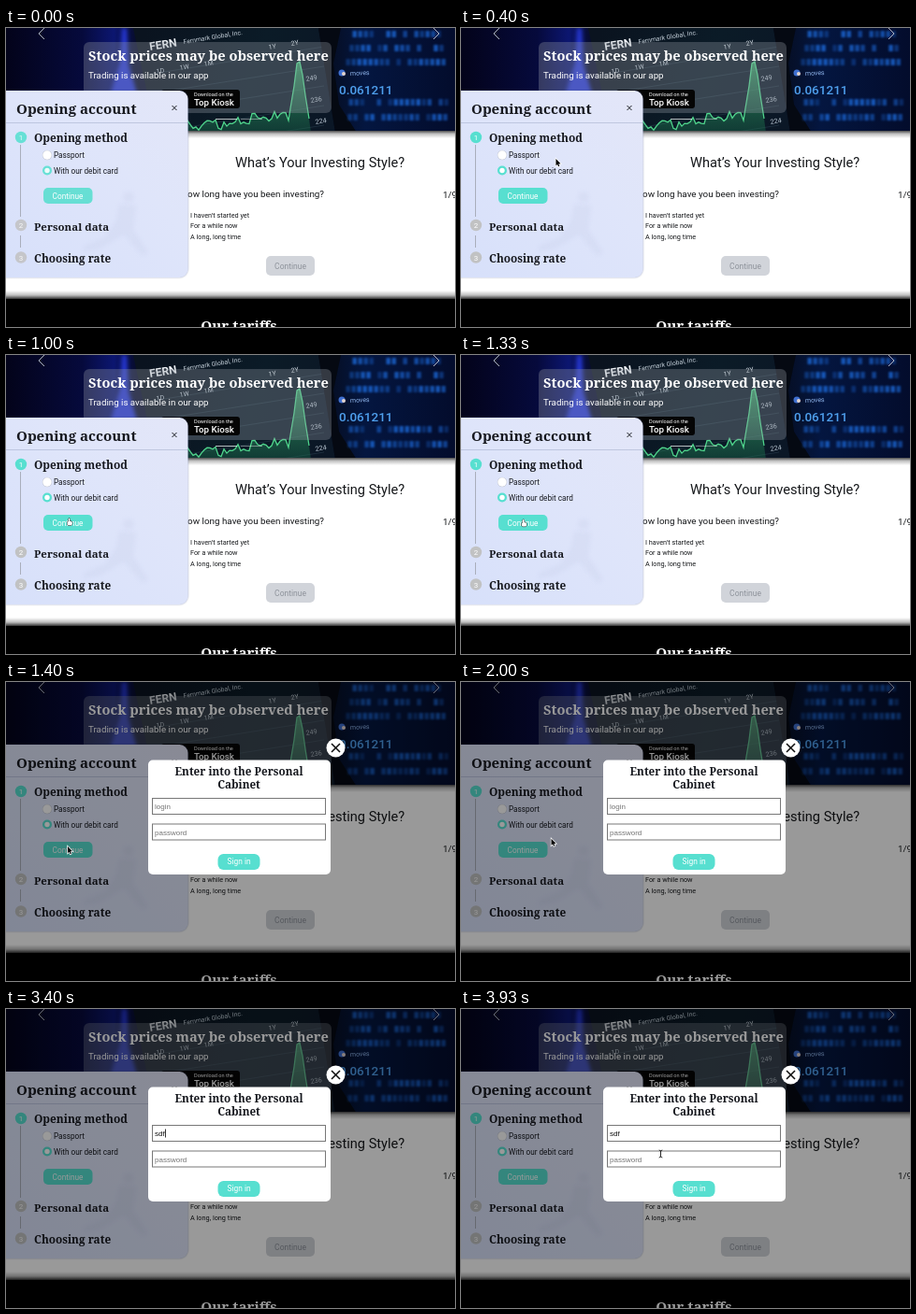
Write an HTML page with a canvas that moves like this. It is 480 px wide and 320 px high and loops after 3.99 s.

```html
<!DOCTYPE html>
<html lang="en">
<head>
<meta charset="utf-8">
<title>Opening account</title>
<style>
html, body { margin: 0; width: 100%; height: 100%; overflow: hidden; background: #000; }
canvas { display: block; width: 480px; height: 320px; }
</style>
</head>
<body>
<canvas id="stage" width="480" height="320"></canvas>
<script>
const LOOP = 3990, STEP = 200 / 3;
const MODAL_AT = 1395, FADE_IN = 260;
const TEAL = '#57dfd0', INK = '#17191f', TILT = -0.16;
const SANS = 'Roboto, sans-serif', SERIF = '"Noto Serif", serif', FIELD = '"Liberation Sans", sans-serif';
const stage = document.getElementById('stage').getContext('2d');
let c = stage;

function text(s, x, y, size, color, family = SANS, weight = 400, align = 'left') {
  c.font = `${weight} ${size}px ${family}`;
  c.textAlign = align;
  c.fillStyle = color;
  c.fillText(s, x, y);
}

function heading(s, x, y, size, color = INK, align = 'left') {
  text(s, x, y, size, color, SERIF, 700, align);
}

function tilted(s, x, y, size, color, weight = 400, angle = TILT) {
  c.save();
  c.translate(x, y);
  c.rotate(angle);
  text(s, 0, 0, size, color, SANS, weight);
  c.restore();
}

function rect(x, y, w, h, color) {
  c.fillStyle = color;
  c.fillRect(x, y, w, h);
}

function box(x, y, w, h, r, color) {
  c.beginPath();
  c.roundRect(x, y, w, h, r);
  c.fillStyle = color;
  c.fill();
}

function disc(x, y, r, color) {
  c.beginPath();
  c.arc(x, y, r, 0, Math.PI * 2);
  c.fillStyle = color;
  c.fill();
}

function path(points, color, width) {
  c.beginPath();
  points.forEach(([x, y]) => c.lineTo(x, y));
  c.strokeStyle = color;
  c.lineWidth = width;
  c.stroke();
}

function shape(points, color) {
  c.beginPath();
  points.forEach(([x, y]) => c.lineTo(x, y));
  c.closePath();
  c.fillStyle = color;
  c.fill();
}

function gradient(x0, y0, x1, y1, ...stops) {
  const g = c.createLinearGradient(x0, y0, x1, y1);
  stops.forEach(([at, color]) => g.addColorStop(at, color));
  return g;
}

function seeded(seed) {
  return () => (seed = (seed * 16807) % 2147483647) / 2147483647;
}

function drawPhoto() {
  const rnd = seeded(71);
  rect(0, 0, 480, 112, gradient(0, 0, 480, 0,
    [0, '#03031a'], [0.17, '#060a3c'], [0.24, '#0c1670'], [0.29, '#070c2c'],
    [0.7, '#060c1c'], [0.8, '#041640'], [1, '#030c2c']));

  // blurred bar on the left
  c.save();
  c.filter = 'blur(2px)';
  shape([[112, 70], [122, 36], [124, 0], [129, 0], [131, 40], [140, 70]], '#2637d2');
  c.restore();

  // tablet
  shape([[136, 0], [334, 0], [352, 112], [160, 112]], gradient(150, 0, 350, 60, [0, '#0a131f'], [0.6, '#0b1b27'], [1, '#0b1726']));
  for (let i = 0; i < 5; i++) {
    path([[150, 50 + i * 21], [340, 20 + i * 21]], 'rgba(125,165,185,.22)', 0.7);
  }
  tilted('FERN', 154, 24, 12, '#eef2f6', 700);
  tilted('Fernmark Global, Inc.', 190, 17, 6.8, '#c9d4de');
  tilted('1D', 161, 49, 7, '#c3ced8');
  tilted('1W', 186, 45, 7, '#c3ced8');
  tilted('1M', 212, 41, 7, '#c3ced8');
  tilted('1Y', 281, 23, 7, '#dbe5ec');
  tilted('2Y', 305, 19, 7, '#dbe5ec');

  // price line
  const line = [[190, 111]];
  for (let x = 194; x < 304; x += 3) {
    line.push([x, 106 - (x - 194) * 0.12 + (rnd() - 0.5) * 14]);
  }
  line.push([304, 86], [308, 62], [311, 38], [314, 36], [317, 50], [320, 72], [324, 97]);
  shape([...line, [326, 112], [190, 112]], gradient(0, 35, 0, 112, [0, 'rgba(75,205,125,.7)'], [1, 'rgba(25,110,75,.4)']));
  path(line, '#4fd58c', 1.3);
  tilted('249', 321, 57, 7.2, '#b9c6d2');
  tilted('236', 326, 80, 7.2, '#b9c6d2');
  tilted('224', 331, 103, 7.2, '#b9c6d2');

  // numbers board on the right
  shape([[334, 0], [358, 0], [350, 38], [356, 82], [375, 112], [352, 112]], '#050912');
  c.save();
  c.filter = 'blur(1px)';
  for (const y of [3, 18, 33, 76, 92]) {
    for (let x = 362 + rnd() * 12; x < 470; x += 6) {
      if (rnd() < 0.72) rect(x, y, 4.5, 7, `rgba(28,104,215,${0.3 + rnd() * 0.5})`);
    }
  }
  c.restore();
  tilted('0.061211', 356, 71, 13.5, '#4fa0ee', 500, 0);
  disc(359, 48, 3.5, '#3f6fd0');
  disc(361, 49, 2, '#e3d3cc');
  tilted('moves', 368, 51, 7, '#8fb4ea', 400, -0.05);
}

function drawHero() {
  drawPhoto();
  path([[41, 0], [35, 6], [41, 12]], '#aeb6c5', 1);
  path([[457, 0], [463, 6], [457, 12]], '#aeb6c5', 1);
  box(83, 15, 265, 76, 6, 'rgba(150,155,165,.33)');
  heading('Stock prices may be observed here', 88, 34.5, 14.65, '#fff');
  text('Trading is available in our app', 88, 54, 9.75, '#fff');
  box(166, 66, 84, 20, 3, '#050505');
  text('Download on the', 201, 73, 5.6, '#fff');
  text('Top Kiosk', 201, 83, 9.8, '#fff', SANS, 500);
  rect(224, 97, 23, 1, 'rgba(255,255,255,.7)');
  rect(251, 97, 23, 1, 'rgba(255,255,255,.4)');
}

function drawQuiz() {
  rect(0, 110, 480, 181, '#fff');
  rect(0, 110, 480, 8, gradient(0, 110, 0, 118, [0, 'rgba(0,0,0,.7)'], [0.4, 'rgba(0,0,0,.25)'], [1, 'rgba(0,0,0,0)']));
  text('What’s Your Investing Style?', 245, 149, 14.6, '#16181b');
  text('How long have you been investing?', 340, 181, 9.85, '#16181b', SANS, 400, 'right');
  text('1/9', 467, 182, 9.85, '#16181b');
  ['I haven’t started yet', 'For a while now', 'A long, long time'].forEach((s, i) =>
    text(s, 197, 202.5 + i * 11.8, 7.3, '#16181b'));
  box(278, 244, 52, 21, 5, '#d1d4da');
  text('Continue', 304, 257.5, 8.5, '#8d929a', SANS, 400, 'center');
  rect(0, 281, 480, 9, gradient(0, 281, 0, 290, [0, 'rgba(0,0,0,0)'], [0.55, 'rgba(0,0,0,.25)'], [1, 'rgba(0,0,0,.8)']));
  rect(0, 290, 480, 30, '#000');
  heading('Our tariffs', 249, 324, 15.2, '#fff', 'center');
}

function drawPanel(solid) {
  c.save();
  c.shadowColor = 'rgba(60,75,130,.5)';
  c.shadowBlur = 2;
  box(-12, 67, 206.5, 200, 9, gradient(0, 267, 195, 67, [0, '#d7e0fa'], [0.6, '#dfe5fa'], [1, '#e3e6f8']));
  c.restore();

  // soft figure showing through the glass
  c.save();
  c.filter = 'blur(2px)';
  c.globalAlpha = 0.12;
  disc(131, 181, 6, '#a9b4d2');
  shape([[121, 189], [139, 190], [136, 216], [152, 240], [146, 244], [126, 221], [100, 236], [82, 239], [84, 233], [106, 224], [118, 206]], '#a9b4d2');
  c.restore();

  heading('Opening account', 11, 92, 15.1);
  path([[177.5, 83], [182.5, 88]], INK, 1);
  path([[182.5, 83], [177.5, 88]], INK, 1);
  rect(0, 101, 194, 1, 'rgba(150,160,190,.45)');
  rect(15, 125, 1, 77, '#a9aebb');
  rect(15, 222, 1, 13, '#a9aebb');

  c.save();
  c.globalAlpha = solid;
  [[117, TEAL], [211, '#c1c2c3'], [245.5, '#c1c2c3']].forEach(([y, color], i) => {
    disc(16, y, 6.2, color);
    text(String(i + 1), 16, y + 3, 8, '#fff', SANS, 400, 'center');
  });
  disc(44, 152.5, 5, TEAL);
  disc(44, 152.5, 2.7, '#fff');
  box(40, 171, 52.5, 17, 5, TEAL);
  c.restore();

  disc(44, 136, 5.2, '#c5cad6');
  disc(44, 136, 4.7, '#fff');
  heading('Opening method', 30, 122, 11.9);
  heading('Personal data', 30, 216.5, 11.5);
  heading('Choosing rate', 30, 251, 11.8);
  text('Passport', 51, 139, 8.2, INK);
  text('With our debit card', 51, 155.5, 8.2, INK);
  text('Continue', 66, 182.5, 8.3, '#fff', SANS, 400, 'center');
}

function drawField(y, value, hint, caret) {
  rect(156, y, 186, 18, '#777');
  rect(157, y + 1, 184, 16, '#fff');
  text(value || hint, 159, y + 12, 8, value ? '#111' : '#757575', FIELD);
  if (caret) rect(159.5 + (value ? c.measureText(value).width : 0), y + 4.5, 0.8, 9, '#000');
}

function drawModal(t) {
  rect(0, 0, 480, 320, 'rgba(0,0,0,.4)');
  box(152, 83.5, 195, 122.5, 5, '#fff');
  disc(352.5, 70.5, 10, '#fff');
  path([[348, 66], [357, 75]], '#111', 1.6);
  path([[357, 66], [348, 75]], '#111', 1.6);
  heading('Enter into the Personal', 249, 100, 11.7, INK, 'center');
  heading('Cabinet', 249, 114, 11.7, INK, 'center');
  const typed = 'sdf'.slice(0, t < 3060 ? 0 : 1 + Math.floor((t - 3060) / 133));
  drawField(124, typed, 'login', t > 2790 && t < 3795);
  drawField(151.5, '', 'password', false);
  box(226.5, 184, 45, 17, 6, TEAL);
  text('Sign in', 249, 195.3, 8.4, '#fff', SANS, 400, 'center');
}

// pointer stops: time, x, y
const track = [[330, 104, 138], [730, 73, 164], [1070, 66, 176], [1800, 66, 176], [2500, 220, 134],
  [3000, 220, 134], [3780, 220, 135], [3930, 213.5, 155]];

function pointerAt(t) {
  let i = 0;
  while (i < track.length - 2 && t > track[i + 1][0]) i++;
  const [t0, x0, y0] = track[i], [t1, x1, y1] = track[i + 1];
  const p = Math.max(0, Math.min(1, (t - t0) / (t1 - t0)));
  const e = p * p * (3 - 2 * p);
  return [x0 + (x1 - x0) * e, y0 + (y1 - y0) * e];
}

function outlined(points) {
  c.beginPath();
  points.forEach(([x, y]) => c.lineTo(x, y));
  c.closePath();
  c.strokeStyle = '#fff';
  c.lineWidth = 1.4;
  c.stroke();
  c.fillStyle = '#000';
  c.fill();
}

function drawHand() {
  c.beginPath();
  c.roundRect(0, 0, 1.6, 6, 0.8);
  c.roundRect(-1.2, 3.2, 5.2, 4.4, 1.5);
  c.strokeStyle = '#222';
  c.lineWidth = 1;
  c.stroke();
  c.fillStyle = '#fff';
  c.fill();
}

function drawPointer(t) {
  if (t < 330 || (t > 3050 && t < 3780)) return;
  const [x, y] = pointerAt(t);
  c.save();
  c.translate(x, y);
  if (x > 156 && x < 342 && y > 124) {
    path([[-1.8, -4], [0, -3.2], [1.8, -4]], '#111', 0.9);
    path([[0, -3.2], [0, 3.2]], '#111', 0.9);
    path([[-1.8, 4], [0, 3.2], [1.8, 4]], '#111', 0.9);
  } else if (t < MODAL_AT && y > 171) {
    drawHand();
  } else {
    outlined([[0, 0], [0, 7.2], [1.6, 5.8], [2.7, 8.2], [3.8, 7.7], [2.8, 5.3], [5, 5.2]]);
  }
  c.restore();
}

// the page behind never moves, so paint it once
const page = document.createElement('canvas');
page.width = 480;
page.height = 320;
c = page.getContext('2d');
drawHero();
drawQuiz();
c = stage;

function frame(now) {
  const t = Math.floor(((now % LOOP) + 4) / STEP) * STEP;
  c.drawImage(page, 0, 0);
  drawPanel(Math.min(1, 0.88 + 0.12 * t / FADE_IN));
  if (t >= MODAL_AT) drawModal(t);
  drawPointer(t);
}

const start = performance.now();
function tick() {
  frame(performance.now() - start);
  requestAnimationFrame(tick);
}
tick();
</script>
</body>
</html>
```
